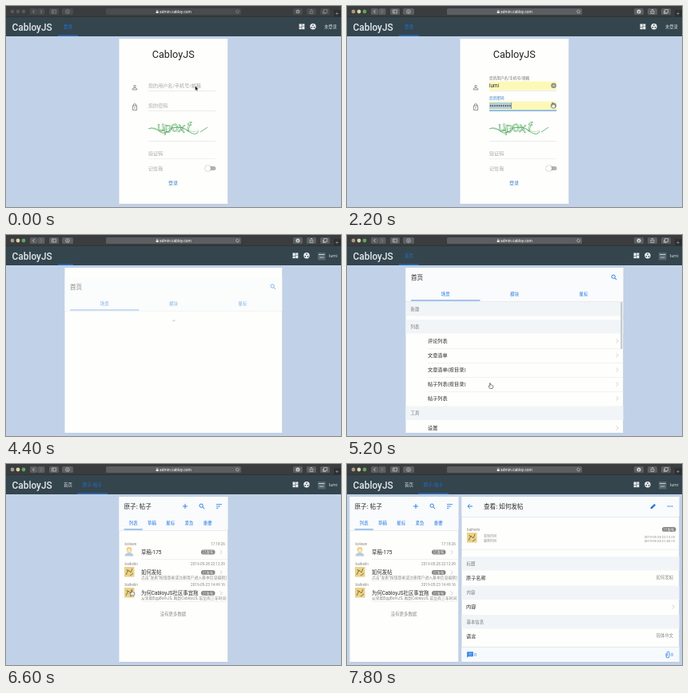
An HTML page with a canvas that plays this animation: 419 px wide and 252 px high, repeating every 8 s.

```html
<!DOCTYPE html>
<html lang="zh-CN">
<head>
<meta charset="utf-8">
<title>CabloyJS</title>
<style>
html, body { margin: 0; width: 100%; height: 100%; overflow: hidden; background: #c1d1e8; }
canvas { display: block; width: 419px; height: 252px; }
</style>
</head>
<body>
<canvas id="stage"></canvas>
<script>
const W = 419, H = 252, LOOP = 8000, STEP = 200;
const FONT = 'Roboto, "Noto Sans CJK SC", "Noto Sans CJK", sans-serif';
const BLUE = '#2176e2', INK = '#2a2a2a', GREY = '#8a8a88', RULE = '#e4e5e5', BAND = '#f1f5f8';
const USER = 'lumi', AUTHOR = 'baihelin', GUEST = 'kolwen';

const canvas = document.getElementById('stage');
const scale = window.devicePixelRatio || 1;
canvas.width = W * scale;
canvas.height = H * scale;
const c = canvas.getContext('2d');

// ---- drawing helpers ----
function box(x, y, w, h, fill, r = 0) {
  c.fillStyle = fill;
  c.beginPath();
  c.roundRect(x, y, w, h, r);
  c.fill();
}

function dot(x, y, r, fill) {
  c.fillStyle = fill;
  c.beginPath();
  c.arc(x, y, r, 0, Math.PI * 2);
  c.fill();
}

function ring(x, y, r, color, w = 0.8, from = 0, to = Math.PI * 2) {
  c.strokeStyle = color;
  c.lineWidth = w;
  c.beginPath();
  c.arc(x, y, r, from, to);
  c.stroke();
}

function path(d, x, y, color, w = 0.8, fill) {
  c.save();
  c.translate(x, y);
  const p = new Path2D(d);
  if (fill) { c.fillStyle = fill; c.fill(p); }
  if (color) { c.strokeStyle = color; c.lineWidth = w; c.stroke(p); }
  c.restore();
}

// y is the middle of the capitals
function text(s, x, y, size, color = INK, align = 'left', weight = 400) {
  c.font = `${weight} ${size}px ${FONT}`;
  c.textAlign = align;
  c.fillStyle = color;
  c.fillText(s, x, y + size * 0.37);
}

function rule(x, y, w, color = RULE) { box(x, y, w, 0.6, color); }
function chevron(x, y) { path('M-1.3 -2.6L1.3 0L-1.3 2.6', x, y, '#b9bbbd', 0.7); }

function panel(x, w) {
  c.save();
  c.shadowColor = 'rgba(40,60,90,.2)';
  c.shadowBlur = scale;
  box(x + 0.5, 41, w - 1, 207, '#fefefd');
  c.restore();
}

function search(x, y, color) {
  ring(x - 0.8, y - 0.8, 2.2, color, 0.9);
  path('M.9 .9L3.2 3.2', x, y, color, 1);
}

function badge(x, y) {
  box(x, y - 3, 17.5, 6, '#858585', 3);
  text('已发布', x + 8.75, y, 4.5, '#f4f4f4', 'center');
}

function personPic(x, y) {
  path('M-5.5 6Q-5 1.5 0 1.5Q5 1.5 5.5 6Z', x, y, null, 0, '#b9cbe0');
  dot(x, y - 2, 3.3, '#ecc664');
  dot(x, y - 1.3, 2.4, '#f9e6c0');
}

function authorPic(x, y) {
  box(x, y, 12.5, 12.5, '#ead28a');
  path('M2 10L5 4L8 7L10 2M3 3L5 6M7 11L11 8', x, y, '#7d6a38', 0.9);
}

// ---- browser and site header ----
function browser(active) {
  box(0, 0, W, 14, '#3a3c3e');
  box(0, 13.5, W, 0.7, '#252a2d');
  const key = active ? '#5c5f61' : '#494c4e', mark = active ? '#d5d7d8' : '#96999b';
  ['#a49c88', '#dcd3a8', '#62a45c'].forEach((k, i) => dot(8 + i * 7, 7, 2.4, active ? k : '#55585a'));
  [[30, 9], [39.5, 9], [54, 12], [70, 14], [359, 12], [376, 12], [393, 12]]
    .forEach(([x, w]) => box(x, 3, w, 8, key, 1.5));
  path('M1 -2L-1 0L1 2', 34.5, 7, mark);
  path('M-1 -2L1 0L-1 2', 44, 7, '#8a8c8e');
  path('M-2.5 -2H2.5V2H-2.5ZM-.8 -2V2', 60, 7, mark, 0.6);
  ring(77, 7, 2.4, mark, 0.6);
  path('M0 -1.2V1.2M-.9 .4L0 1.3L.9 .4', 77, 7, mark, 0.5);
  box(125, 3, 169, 8, key, 1.5);
  box(187.7, 6.5, 3, 2.6, '#eee', 0.4);
  ring(189.2, 6.3, 1, '#eee', 0.5, Math.PI, 0);
  text('admin.cabloy.com', 192, 7, 4.9, '#fff');
  ring(289.5, 7, 1.8, mark, 0.6, 0, 5);
  dot(291.2, 6, 0.6, mark);
  dot(365, 7, 2.5, mark);
  path('M0 -1.3V1M-1 0L0 1.2L1 0', 365, 7, '#444', 0.6);
  path('M-1 -1H-2V2.5H2V-1H1M0 1V-3M-1 -2L0 -3L1 -2', 382, 7, mark, 0.6);
  path('M-1.5 -2.5H2.5V1.5H-1.5ZM-2.5 -1V2.5H1', 399, 7, mark, 0.6);
  box(410, 5, 9, 8.5, '#2d3032');
  path('M-1.7 0H1.7M0 -1.7V1.7', 414, 9.5, '#aaa', 0.6);
}

function siteBar(t) {
  box(0, 14, W, 24, '#35454d');
  text('CabloyJS', 7.5, 26.2, 11.9, '#e3eaee', 'left', 500);
  const inside = t >= 4400, x = inside ? 362 : 370;
  for (let i = 0; i < 4; i++) {
    const right = i & 1, low = i >> 1, tall = right === low;
    box(x - 3.4 + right * 3.7, 22.5 + (low ? (tall ? 2.9 : 4.3) : 0), 3.1, tall ? 3.8 : 2.4, '#eef2f4');
  }
  dot(x + 14, 25.8, 3.7, '#eef2f4');
  [[0, -1.7], [-1.6, 1], [1.6, 1]].forEach(([a, b]) => dot(x + 14 + a, 25.8 + b, 0.9, '#35454d'));
  if (inside) {
    box(390, 22, 9.5, 9.5, '#56656d');
    box(391, 24, 7.5, 1, '#c6ced2');
    box(392, 27.5, 5.5, 1.2, '#aab5ba');
    text(USER, 404, 26.3, 5.5, '#d4dade');
  } else {
    text('未登录', 398, 26, 5.3, '#d4dade');
  }
  if (t < 4400) tab('登录', 65, 25, true);
  else if (t < 4600) box(65, 36.6, 19, 1.2, BLUE);
  else tab('首页', 65, 25, t < 6400);
  if (t >= 6400) tab('原子: 帖子', 89, 38, true);
}

function tab(s, x, w, on) {
  text(s, x + w / 2, 26, 5.5, on ? '#1c72d8' : '#dde3e6', 'center');
  if (on) box(x, 36.6, w, 1.2, '#2474d6');
}

// ---- login form ----
function clearMark(y) {
  dot(258.5, y, 3.3, '#8f9086');
  path('M-1.2 -1.2L1.2 1.2M1.2 -1.2L-1.2 1.2', 258.5, y, '#fff', 0.7);
}

function field(label, y, value, focus, filled) {
  const up = value !== '' || focus;
  if (filled) box(178, y - 5.2, 84, 11, '#fcf9b8');
  if (up) text(label, 178, y - 9.8, 4.65, focus ? '#3a80cc' : '#737373');
  else text(label, 178, y, 6.1, '#a6a6a4');
  if (value) clearMark(y);
  if (focus) box(178, y + 5.8, 84, 1.1, '#5b97d8');
  else rule(178, y + 6.5, 84);
}

function captcha() {
  const green = '#4aa455';
  path('M178 154Q186 151 192 157T208 153Q220 150 228 157Q238 164 241 157M243 158L252 152', 0, 0, green, 0.8);
  path('M181 152C195 163 208 146 224 154S239 154 241 156', 0, 0, '#79bd80', 0.5);
  [...'upoxf'].forEach((ch, i) => {
    c.save();
    c.translate(194 + i * 8.6, 153 + (i % 2 ? 0.8 : -0.4));
    c.rotate([-0.1, 0.12, -0.16, 0.1, 0.2][i]);
    c.font = '17px "Liberation Sans", sans-serif';
    c.textAlign = 'center';
    c.strokeStyle = green;
    c.lineWidth = 0.55;
    c.strokeText(ch, 0, 4.5);
    c.restore();
  });
}

function login(t) {
  panel(141, 137);
  text('CabloyJS', 209.2, 60.2, 12.7, '#222', 'center');
  const filled = t >= 200, typing = t >= 2800;
  ring(161, 100.6, 1.3, '#6a6a6a', 0.7);
  path('M-2.8 4.6V3.6Q-2.4 2.3 0 2.3Q2.4 2.3 2.8 3.6V4.6Z', 161, 100.4, '#6a6a6a', 0.7);
  path('M-2.6 -1.5H2.6V3.8H-2.6ZM-1.6 -1.5V-2.6Q-1.6 -4 0 -4Q1.6 -4 1.6 -2.6V-1.5', 161, 126.6, '#666', 0.7);
  dot(161, 127.7, 0.7, '#666');

  field('您的用户名/手机号/邮箱', 99.8, filled ? USER : '', false, filled);
  if (filled) text(USER, 178, 100, 6.3);
  field('您的密码', 124.8, filled ? '*' : '', filled && !typing, filled);
  if (filled) {
    if (!typing) {
      box(178, 121, 27.5, 8, '#b3cddc');
      box(205.5, 121, 0.5, 8, '#555');
    }
    for (let i = 0; i < 10; i++) dot(179.6 + i * 2.7, 125, 0.85, '#2a2a2a');
  }
  captcha();
  rule(178, 169.3, 84);
  const typed = 'upoxf'.slice(0, Math.max(0, (t - 3000) / STEP));
  field('验证码', 184.5, typed, typing, false);
  text(typed, 178, 185, 6.3);
  text('记住我', 178, 203.5, 6.1, '#a6a6a4');
  box(250, 201, 12.5, 5, '#b2b2b2', 2.5);
  c.save();
  c.shadowColor = 'rgba(0,0,0,.5)';
  c.shadowBlur = 1.5 * scale;
  dot(252.5, 203.5, 3.5, '#fff');
  c.restore();
  text('登录', 209, 222, 6, '#4584cc', 'center', 500);
}

// ---- page entry: rises and fades in ----
function enter(t, start, x, w, draw) {
  const k = Math.min(1, Math.max(0, (t - start) / 250));
  c.save();
  c.beginPath();
  c.rect(x + 0.5, 41, w - 1, 207);
  c.clip();
  c.globalAlpha = 1 - (1 - k) ** 1.6;
  c.translate(0, 33 * (1 - k) ** 2);
  draw();
  c.restore();
}

function spinner(x, y, t) {
  ring(x, y, 1.2, '#777', 0.7, t / 130, t / 130 + 4);
}

function headBar(x, w, h) {
  box(x, 41, w, h, '#f9fbfc');
  rule(x, 41 + h, w, '#d6dadd');
}

function tabs(names, x, w) {
  names.forEach((s, i) => text(s, x + w * (i + 0.5), 74, 5.5, BLUE, 'center', i ? 400 : 500));
  box(x, 81.5, w, 1, '#4a8fe2');
}

function section(s, x, y, w, h = 17.5) {
  box(x, y, w, h, BAND);
  text(s, x + 6.5, y + h / 2, 5.4, '#777');
}

// ---- home ----
function home(t) {
  panel(73, 273);
  enter(t, 4300, 73, 273, () => {
    headBar(73, 273, 42);
    text('首页', 80, 53, 7.6, INK, 'left', 500);
    search(334, 53, BLUE);
    tabs(['场景', '模块', '星标'], 80, 86.4);
    if (t < 4800) return spinner(210, 96, t);
    section('新建', 73, 84, 273);
    section('列表', 73, 106, 273);
    if (t >= 6200) box(73, 196, 273, 18, '#e9edf0');
    ['评论列表', '文章清单', '文章清单(按目录)', '帖子列表(按目录)', '帖子列表'].forEach((s, i) => {
      const y = 133 + i * 18;
      text(s, 101, y, 6.2);
      chevron(338, y);
      if (i < 4) rule(101, y + 9, 245);
    });
    section('工具', 73, 214.5, 273);
    text('设置', 101, 242, 6.2);
    chevron(338, 242);
    box(342.3, 84, 2, 59, '#c3c5c7', 1);
  });
}

// ---- post list ----
function clipped(x, y, w, h, ...label) {
  c.save();
  c.beginPath();
  c.rect(x, y, w, h);
  c.clip();
  text(...label);
  c.restore();
}

function post(x, y, who, when, title, note) {
  text(who, x + 7.5, y + 0.3, 4.7, GREY);
  text(when, x + 133, y + 0.3, 4.7, GREY, 'right');
  clipped(x + 28, y, 72, 19, title, x + 28, y + 11, 6.4);
  badge(x + 103, y + 11);
  chevron(x + 128, y + 11);
  if (note) {
    clipped(x + 28, y + 13, 107, 9, note, x + 28, y + 17.4, 4.85, GREY);
    authorPic(x + 7, y + 4);
  } else {
    personPic(x + 13, y + 10);
  }
  rule(x + 28, y + (note ? 21.5 : 20), 109);
}

function posts(x, t) {
  panel(x, 137);
  enter(t, 6300, x, 137, () => {
    headBar(x, 137, 42);
    text('原子: 帖子', x + 6.5, 53, 7.6, INK, 'left', 500);
    path('M-3 0H3M0 -3V3', x + 83, 53, BLUE, 0.9);
    search(x + 104, 53, BLUE);
    path('M-3.5 -2.4H3.5M-3.5 0H1.5M-3.5 2.4H-1', x + 125.5, 53, BLUE, 0.8);
    tabs(['列表', '草稿', '星标', '紧急', '重要'], x + 6.5, 23.3);
    if (t < 6600) return spinner(x + 68, 96, t);
    if (t === 7200) box(x, 120, 137, 26, '#edf0f3');
    post(x, 99.5, GUEST, '17:18:26', '草稿-175');
    post(x, 125, AUTHOR, '2019-05-28 22:12:39', '如何发帖',
      '点击“发表”按钮登录或注册用户进入基本信息编辑页');
    post(x, 151, AUTHOR, '2019-05-23 14:49:16', '为何CabloyJS社区事宜拖延',
      '从早期EggBornJS, 再到CabloyJS, 前后有三年时间');
    text('没有更多数据', x + 68, 188.5, 5.4, GREY, 'center');
  });
}

// ---- single post ----
function detail(t) {
  panel(143, 273);
  enter(t, 7300, 143, 273, () => {
    headBar(143, 273, 25);
    path('M3 0H-3M-.3 -2.8L-3 0L-.3 2.8', 154, 53, BLUE, 0.9);
    text('查看: 如何发帖', 171, 53, 7.6, INK, 'left', 500);
    path('M-3.3 3.3V1.6L1.4 -3.1L3.1 -1.4L-1.6 3.3Z', 383, 53, null, 0, BLUE);
    [-2.5, 0, 2.5].forEach(d => dot(404 + d, 53, 0.8, BLUE));
    if (t < 7600) return spinner(279, 80, t);
    text(AUTHOR, 150, 82, 4.7, GREY);
    badge(394, 82);
    authorPic(150, 86);
    [['发帖时间', '2019-05-28 22:12:39'], ['最新时间', '2019-05-28 21:43:15']].forEach(([k, v], i) => {
      text(k, 171, 91 + i * 5.3, 4, GREY);
      text(v, 410, 91 + i * 5.3, 4.2, GREY, 'right');
    });
    rule(143, 107, 273);
    [['标题', '原子名称', '如何发帖'], ['内容', '内容', ''], ['基本信息', '语言', '简体中文']].forEach(([head, k, v], i) => {
      const y = 116 + i * 36.5;
      section(head, 143, y, 273);
      text(k, 149, y + 26.5, 6.2);
      if (v) text(v, 408, y + 26.5, 5.3, GREY, 'right');
      else chevron(408, y + 26.5);
    });
    box(143, 229, 273, 19, '#f7fafc');
    rule(143, 229, 273, '#cfd4d8');
    path('M-3.8 -3.5H3.8V2.3H-2.2L-3.8 3.8Z', 154, 239, null, 0, BLUE);
    path('M-2.4 -1.7H2.4M-2.4 .3H2.4', 154, 239, '#fff', 0.6);
    text('0', 159, 239, 5.5, BLUE);
    path('M-2 -1.5V2Q-2 4 0 4Q2 4 2 2V-2.5Q2 -3.8 .7 -3.8Q-.6 -3.8 -.6 -2.5V1.7', 401, 239, BLUE, 0.8);
    text('0', 405, 239, 5.5, BLUE);
  });
}

// ---- pointer: time, x, y ----
const ROUTES = [
  [[200, 258, 124], [2400, 258, 124], [2800, 238, 182]],
  [[4800, 222, 168], [5600, 138, 209], [6200, 138, 209], [6600, 158, 161], [7000, 178, 138], [7200, 178, 138]]
];

function pointer(t) {
  if (t < 200) {
    path('M0 -2V4L1.4 2.8L2.3 4.7L3.3 4.2L2.4 2.4L4.2 2.2Z', 236.5, 102, '#fff', 0.4, '#111');
    return;
  }
  for (const r of ROUTES) {
    for (let i = 1; i < r.length; i++) {
      const [t0, x0, y0] = r[i - 1], [t1, x1, y1] = r[i];
      if (t < t0 || t > t1) continue;
      const k = (t - t0) / (t1 - t0), e = k * k * (3 - 2 * k);
      path('M-1.6 .5V-2.6Q-1 -3.6 -.4 -2.6V-.6Q1 -1 1.4 -.2Q2.8 -.2 2.8 1V2.4L2 4H-1.4L-3.2 1.4Q-3.2 .2 -1.6 1Z',
        x0 + (x1 - x0) * e, y0 + (y1 - y0) * e, '#444', 0.6, '#eee');
      return;
    }
  }
}

function draw(t) {
  c.setTransform(scale, 0, 0, scale, 0, 0);
  box(0, 0, W, H, '#c1d1e8');
  browser(t >= 200);
  siteBar(t);
  if (t < 4400) login(t);
  else if (t < 6400) home(t);
  else if (t < 7400) posts(141, t);
  else { posts(3, t); detail(t); }
  pointer(t);
}

const begin = performance.now();
function tick() {
  const t = (performance.now() - begin) % LOOP;
  draw(Math.floor(t / STEP) * STEP);
  requestAnimationFrame(tick);
}
tick();
</script>
</body>
</html>
```
